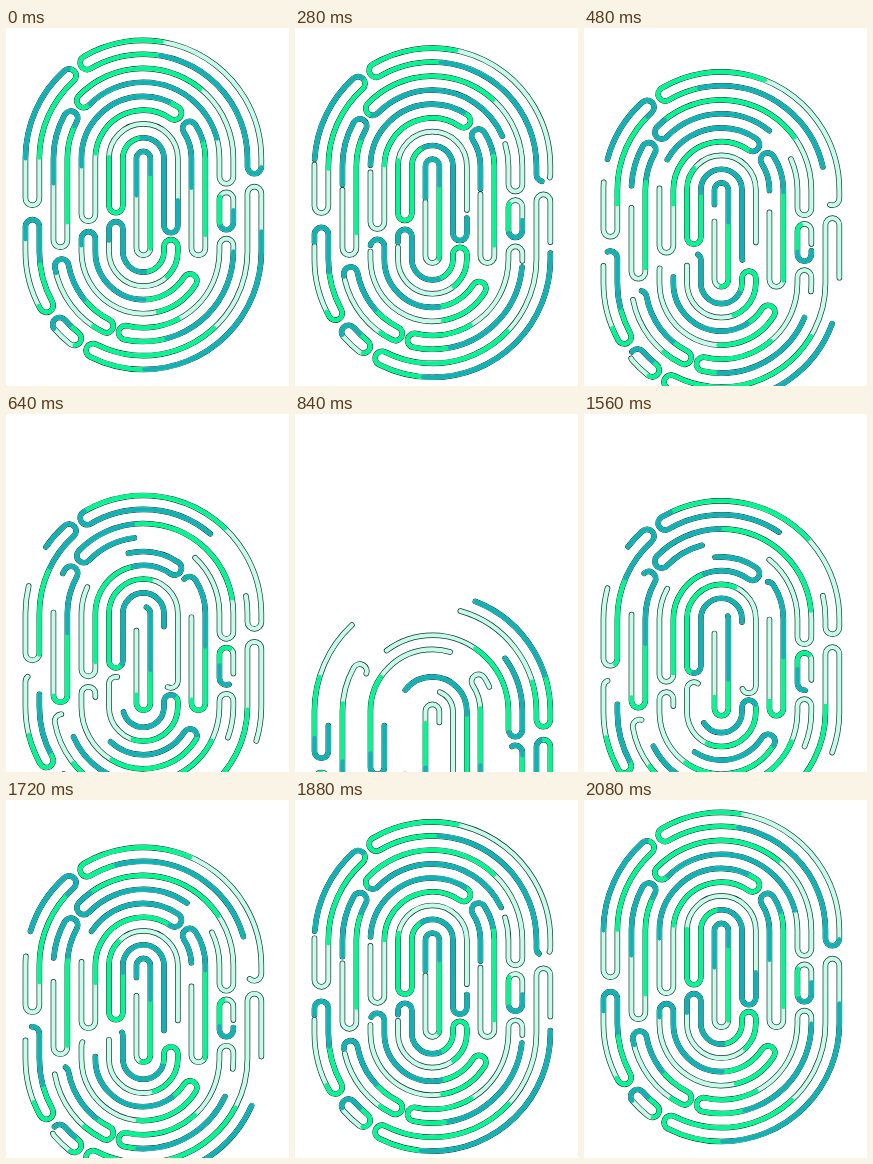
Recreate the animation shown at these times as an HTML page with a canvas. Size 283 px wide and 358 px high, loop 2120 ms.

```html
<!DOCTYPE html>
<html lang="en">
<head>
<meta charset="utf-8">
<title>Fingerprint</title>
<style>
  html, body { margin: 0; width: 283px; height: 358px; overflow: hidden; background: #fff; }
  canvas { display: block; }
</style>
</head>
<body>
<canvas id="stage" width="283" height="358"></canvas>
<script>
const ctx = document.getElementById('stage').getContext('2d');
const LOOP = 2120, STEP = 40;
const CX = 137.4, TOP = 130.3, BOTTOM = 223.6, HALF = 6.95;
const TEAL = '#14b0b8', GREEN = '#00f890', MINT = '#c8fae8', EDGE = '#0a3a36';
const rad = deg => deg * Math.PI / 180;

// A closed ridge loop: two concentric arcs from a0 to a1 with tangent legs and
// round ends, traced clockwise. `from` is where the colours begin on the path.
function ridge(cy, r, a0, a1, leg0, leg1, from) {
  const p = new Path2D(), A = rad(a0), B = rad(a1);
  const at = (q, a, leg) => [
    CX + q * Math.cos(a) - leg * Math.sin(a),
    cy + q * Math.sin(a) + leg * Math.cos(a)
  ];
  const bent = a1 > a0;
  p.moveTo(...at(r + HALF, A, -leg0));
  if (bent) p.arc(CX, cy, r + HALF, A, B);
  p.lineTo(...at(r + HALF, B, leg1));
  p.arc(...at(r, B, leg1), HALF, B, B + Math.PI);
  if (bent) p.arc(CX, cy, r - HALF, B, A, true);
  p.lineTo(...at(r - HALF, A, -leg0));
  p.arc(...at(r, A, -leg0), HALF, A + Math.PI, A + 2 * Math.PI);
  p.closePath();
  const size = 2 * (r * (B - A) + leg0 + leg1 + Math.PI * HALF);
  return { p, size, from: from + leg0 };
}

const ridges = [
  ridge(TOP, 111, 239.5, 360, 0, 8.5, 257),
  ridge(TOP, 83, 224, 360, 0, 18.5, 292),
  ridge(TOP, 111, 180, 228, 40, 0, 0),
  ridge(TOP, 55, 180, 304.5, 56, 0, -8),
  ridge(TOP, 83, 180, 209, 82, 0, -25),
  ridge(TOP, 27.5, 180, 360, 47.5, 67.5, 150),
  ridge(TOP, 0, 180, 180, 90, 0, -37),
  ridge(TOP, 55, 327, 360, 0, 90, 208),
  ridge(TOP, 83, 360, 360, -41, 64.5, 52),
  ridge(BOTTOM, 111, 0, 117, 58, 0, -20),
  ridge(BOTTOM, 83, 0, 102.5, 6, 0, 0),
  ridge(BOTTOM, 111, 151, 180, 0, 25, 72),
  ridge(BOTTOM, 111, 128.5, 139, 0, 0, 22),
  ridge(BOTTOM, 83, 116.5, 170, 0, 0, 78),
  ridge(BOTTOM, 55, 32, 180, 0, 13, 166),
  ridge(BOTTOM, 27.5, 0, 180, 5, 23, 119)
];

// time, drop, trim start, trim end
const keys = [
  [60, 0, 0, 0],
  [270, 7, .02, .004],
  [480, 31.5, .10, .024],
  [600, 59, .19, .07],
  [658, 74.5, .25, .1],
  [840, 167, .715, .312],
  [978, 307, 1.28, .61],
  [1000, 352, 1.38, .66],
  [1110, 420, 1.5, .75]
];

function slope(i, c) {
  if (i === 0 || i === keys.length - 1) return 0;
  const a = keys[i - 1], b = keys[i], d = keys[i + 1];
  const h = b[0] - a[0], k = d[0] - b[0];
  return ((b[c] - a[c]) / h * k + (d[c] - b[c]) / k * h) / (h + k);
}

function value(t, c) {
  if (t <= keys[0][0]) return keys[0][c];
  const i = keys.findIndex(k => k[0] > t) - 1;
  if (i < 0) return keys[keys.length - 1][c];
  const a = keys[i], b = keys[i + 1], h = b[0] - a[0], u = (t - a[0]) / h;
  const v = 1 - u;
  return v * v * (1 + 2 * u) * a[c] + u * u * (3 - 2 * u) * b[c]
    + h * u * v * (v * slope(i, c) - u * slope(i + 1, c));
}

// The second half runs the same motion backwards.
function phase(t) {
  if (t < 1109) return t;
  return t < 1720 ? 2218 - t : 498 - (t - 1720) * 1.217;
}

function stroke(r, start, len, colour, width) {
  const full = len >= .9999;
  ctx.setLineDash(full ? [] : [len * r.size, (1 - len) * r.size]);
  ctx.lineDashOffset = -(r.from + start * r.size);
  ctx.strokeStyle = colour;
  ctx.lineWidth = width;
  ctx.stroke(r.p);
}

function draw(t) {
  ctx.setTransform(1, 0, 0, 1, 0, 0);
  ctx.fillStyle = '#fff';
  ctx.fillRect(0, 0, 283, 358);
  if (t >= 1000 && t < 1240) return;
  const u = phase(t), start = value(u, 2) % 1;
  const len = 1 + value(u, 3) - value(u, 2);
  ctx.translate(0, value(u, 1));
  ctx.lineCap = 'round';
  for (const r of ridges) {
    stroke(r, start, len, EDGE, 5.6);
    stroke(r, start, len, MINT, 4.2);
    stroke(r, start, len * 2 / 3, GREEN, 4.2);
    stroke(r, start, len / 3, TEAL, 4.2);
  }
}

function tick() {
  draw(Math.floor(performance.now() % LOOP / STEP) * STEP);
  requestAnimationFrame(tick);
}
tick();
</script>
</body>
</html>
```
